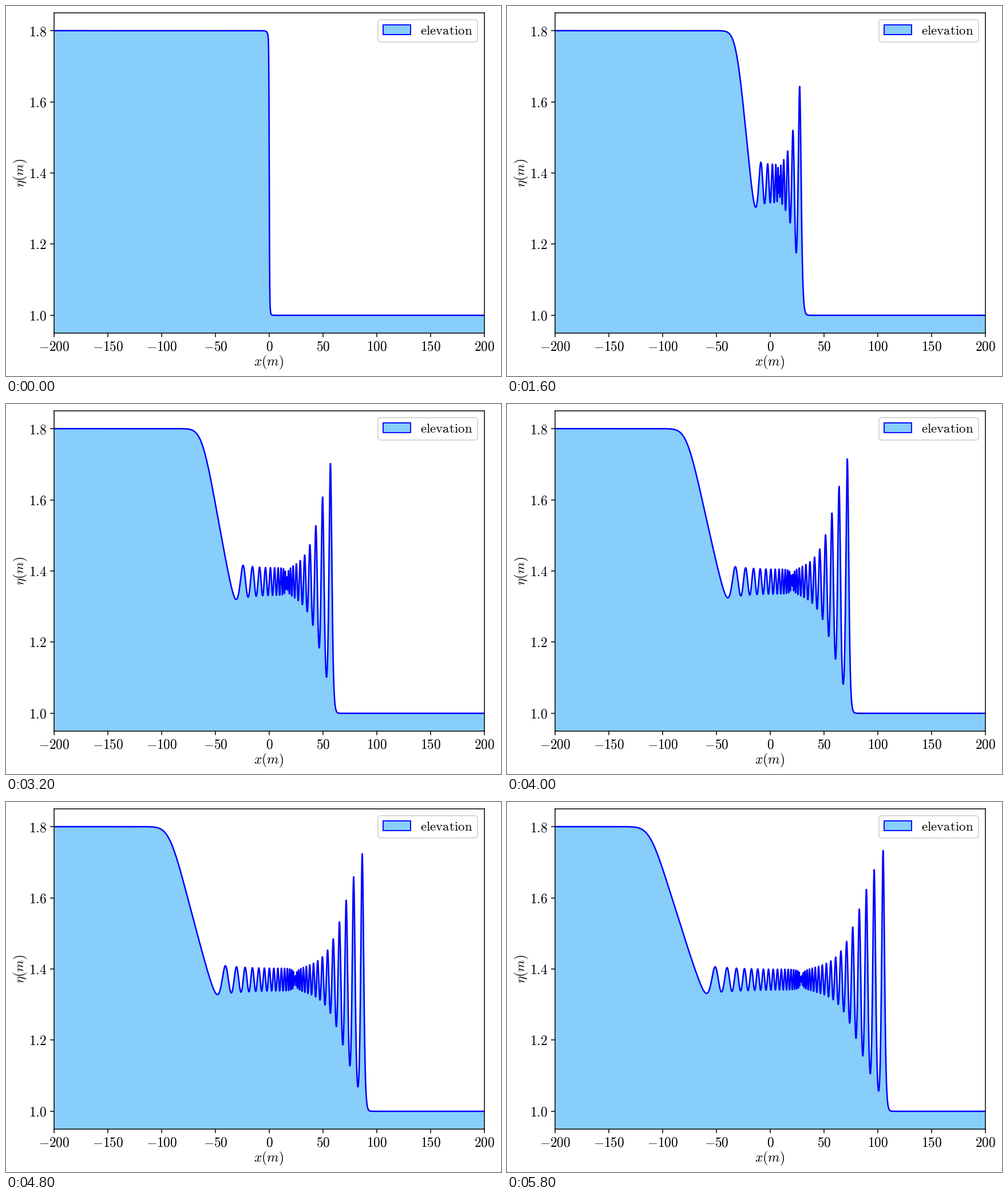
Recreate the animation shown at these times as a matplotlib script. Size 865x647 px, loop 5900 ms.

```python
import numpy as np
import matplotlib.pyplot as plt
from matplotlib.animation import FuncAnimation
from matplotlib.patches import FancyBboxPatch, Rectangle
from matplotlib.transforms import IdentityTransform

W, H, DPI = 865, 647, 135
FRAMES, INTERVAL = 59, 100
GRAVITY = 9.81
DX, COURANT = 1 / 16, 3.45
LEAD = 2            # steps already taken when the loop starts
CREST_END = 104.85  # where the leading crest is when the loop ends

x = np.arange(-150, 130, DX)


def ddx(f):
    out = np.zeros_like(f)
    out[2:-2] = (8 * (f[3:-1] - f[1:-3]) - (f[4:] - f[:-4])) / (12 * DX)
    return out


def velocity(h, m):
    """Solve h u - (h^3 u_x / 3)_x = m by parallel cyclic reduction."""
    k = ((h[1:] + h[:-1]) / 2) ** 3 / (3 * DX**2)
    diag, off, rhs = h.copy(), -k, m
    diag[1:] += k
    diag[:-1] += k
    s = 1
    while s <= 128:
        lo, up = off / diag[:-s], off / diag[s:]
        new_diag, new_rhs = diag.copy(), rhs.copy()
        new_diag[s:] -= lo * off
        new_diag[:-s] -= up * off
        new_rhs[s:] -= lo * rhs[:-s]
        new_rhs[:-s] -= up * rhs[s:]
        off = -up[:-s] * off[s:]
        diag, rhs = new_diag, new_rhs
        s *= 2
    return rhs / diag


def rates(state):
    h, m = state
    u = velocity(h, m)
    flux = u * m + GRAVITY * h**2 / 2 - 2 / 3 * h**3 * ddx(u) ** 2
    return -np.array([ddx(h * u), ddx(flux)])


def step(state):
    """One Runge-Kutta step, its length set by the Courant condition."""
    h, m = state
    fastest = np.abs(velocity(h, m)).max() + np.sqrt(GRAVITY * h.max())
    dt = COURANT * DX / fastest
    k1 = rates(state)
    k2 = rates(state + dt / 2 * k1)
    k3 = rates(state + dt / 2 * k2)
    k4 = rates(state + dt * k3)
    new = state + dt / 6 * (k1 + 2 * k2 + 2 * k3 + k4)
    new[:, 3:-3] += 0.002 * np.diff(new, 6, axis=1)  # damp grid-scale noise
    return new


def simulate():
    """Serre-Green-Naghdi dam break from a smoothed step."""
    state = np.array([1 + 0.4 * (1 - np.tanh(x / 0.4)), np.zeros_like(x)])
    history = [state[0]]
    ahead = x > 40
    for _ in range(850):
        state = step(state)
        h = state[0]
        history.append(h)
        front = h[ahead]
        if front.max() > 1.2 and x[ahead][front.argmax()] >= CREST_END:
            break
    return history[LEAD:]


history = simulate()

plt.rcParams["mathtext.fontset"] = "cm"
fig = plt.figure(figsize=((W + 0.01) / DPI, (H + 0.01) / DPI), dpi=DPI,
                 facecolor="white")
ax = fig.add_axes([84 / W, 75 / H, 752 / W, 560 / H])

xticks = range(-200, 201, 50)
yticks = [1.0, 1.2, 1.4, 1.6, 1.8]
ax.set_xticks(xticks, [f"${v}$" for v in xticks])
ax.set_yticks(yticks, [f"${v:.1f}$" for v in yticks])
ax.tick_params(labelsize=12.5)
ax.tick_params(axis="x", pad=2.9)

pixels = IdentityTransform()


def label(px, py, text, size, **kw):
    ax.text(px, H - py, text, fontsize=size, transform=pixels,
            va="baseline", zorder=6, **kw)


label(458.7, 629, "$x(m)$", 12.6, ha="center")
label(31, 292, r"$\eta(m)$", 12.5, ha="center", rotation=90,
      rotation_mode="anchor")

# Legend
ax.add_patch(FancyBboxPatch(
    (650, H - 63), 174, 39, boxstyle="round,pad=0,rounding_size=4.8",
    transform=pixels, fc="white", ec="0.8", lw=1, alpha=0.8, zorder=5))
ax.add_patch(Rectangle((659, H - 50), 48, 17, transform=pixels,
                       fc="lightskyblue", ec="blue", lw=1, zorder=6))
label(724.5, 50, r"$\mathrm{elevation}$", 12.25, ha="left")

xs = np.concatenate([[-210], x, [210]])
water, = ax.fill(xs, np.ones_like(xs), fc="lightskyblue", lw=0, zorder=1)
curve, = ax.plot(xs, np.ones_like(xs), color="blue", lw=1.35, zorder=2)
ax.set_xlim(-200, 200)
ax.set_ylim(0.95, 1.85)


def draw(i):
    pos = i * (len(history) - 1) / (FRAMES - 1)
    j = min(int(pos), len(history) - 2)
    h = history[j] + (pos - j) * (history[j + 1] - history[j])
    ys = np.concatenate([[1.8], h, [1.0]])
    curve.set_ydata(ys)
    water.set_xy(np.column_stack([np.r_[-210, xs, 210], np.r_[0, ys, 0]]))
    return water, curve


anim = FuncAnimation(fig, draw, frames=FRAMES, interval=INTERVAL,
                     repeat=True, repeat_delay=0)
plt.show()
```
